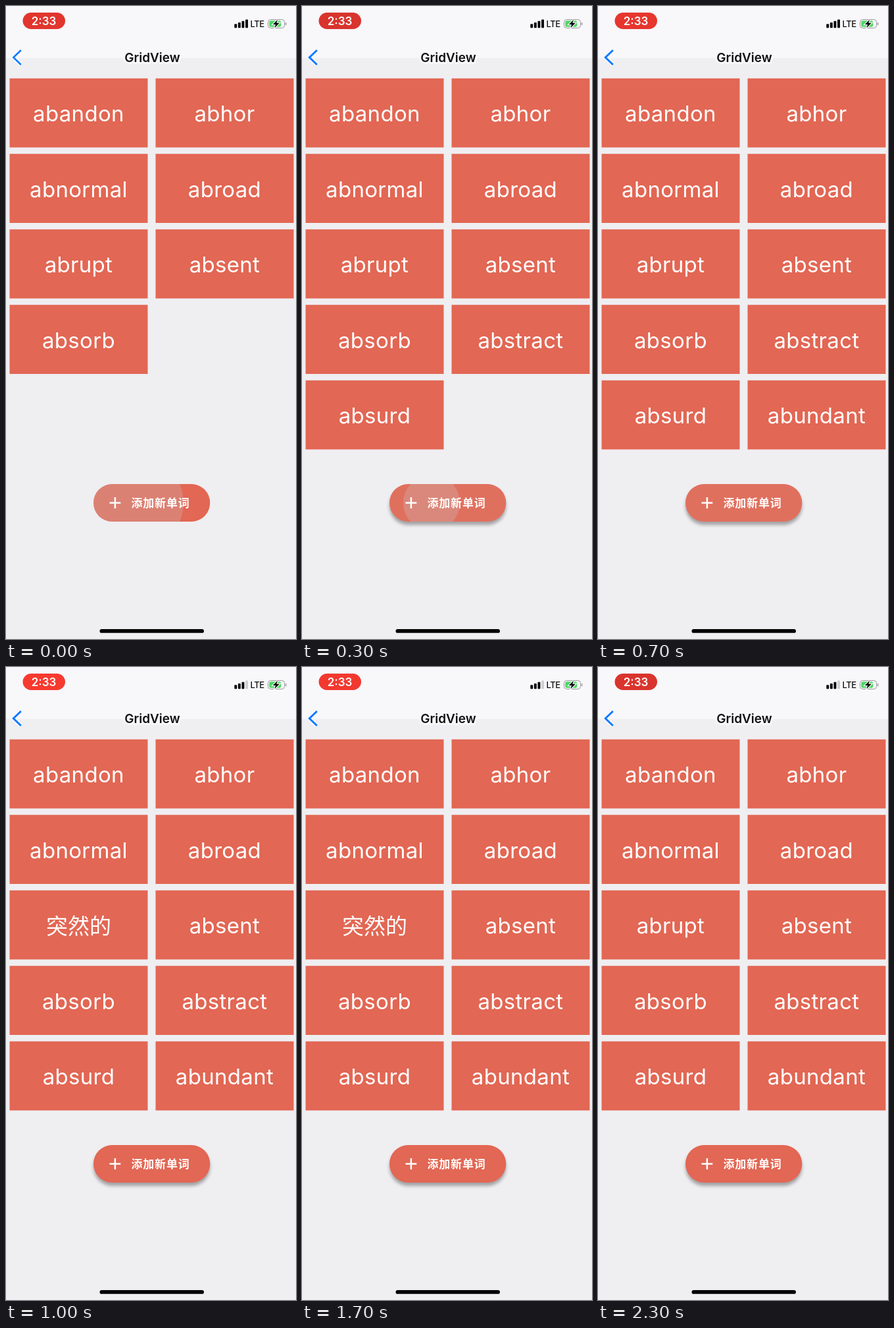
An HTML page with a canvas for the animation above (2400 ms loop, 441 by 960 pixels).

```html
<!DOCTYPE html>
<html lang="zh">
<head>
<meta charset="utf-8">
<title>GridView</title>
<style>
html, body { margin: 0; width: 441px; height: 960px; overflow: hidden; background: #efeef1; }
canvas { display: block; }
</style>
</head>
<body>
<canvas id="stage" width="441" height="960"></canvas>
<script>
const ctx = document.getElementById('stage').getContext('2d');
const LOOP = 2400, STEP = 100;
const CORAL = '#e26754', BAR = '#f8f7fa', PAGE = '#efeef1';
const SANS = 'Inter, Roboto, sans-serif';
const CJK = '"Noto Sans CJK SC", "Noto Sans CJK", sans-serif';
const WORDS = ['abandon', 'abhor', 'abnormal', 'abroad', 'abrupt', 'absent',
  'absorb', 'abstract', 'absurd', 'abundant'];
const FLIPPED = 4;
const TAPS = [-200, 200];   // ripple start times

function box(x, y, w, h, r, fill) {
  ctx.beginPath();
  ctx.roundRect(x, y, w, h, r);
  ctx.fillStyle = fill;
  ctx.fill();
}

function line(points, width, color) {
  ctx.beginPath();
  points.forEach(([x, y]) => ctx.lineTo(x, y));
  ctx.lineWidth = width;
  ctx.strokeStyle = color;
  ctx.stroke();
}

function text(str, x, y, font, color, spacing = 0) {
  ctx.font = font;
  ctx.letterSpacing = spacing + 'px';
  ctx.textAlign = 'center';
  ctx.fillStyle = color;
  ctx.fillText(str, x + spacing / 2, y);
}

function statusBar(t) {
  const glow = (1 - Math.cos((t - 300) / 1000 * Math.PI)) / 2;
  const mix = (a, b) => Math.round(a + (b - a) * glow);
  box(25.5, 10, 64.5, 25, 12.5, `rgb(${mix(217, 255)},${mix(52, 59)},${mix(45, 49)})`);
  text('2:33', 57.5, 29, `600 17px ${SANS}`, '#fff');

  const bars = t < 800 ? 4 : 3;
  for (let i = 0; i < 4; i++) {
    const h = 6 + i * 2.2;
    box(347.3 + i * 5.6, 33.2 - h, 3.9, h, 1, i < bars ? '#050505' : '#cfced1');
  }
  text('LTE', 382.3, 32, `500 13px ${SANS}`, '#111', -0.4);

  ctx.beginPath();
  ctx.roundRect(398.5, 20.5, 25, 13, 4);
  ctx.lineWidth = 1;
  ctx.strokeStyle = '#98989b';
  ctx.stroke();
  box(400.3, 22.3, 18, 9.4, 2.4, '#4cd964');
  box(424.8, 25, 1.6, 4.2, 0.8, '#98989b');
  const bolt = [[413, 20.8], [405.8, 28], [410, 28], [408.4, 33.3], [415.8, 25.8], [411.4, 25.8]];
  line([...bolt, bolt[0]], 2.4, BAR);
  ctx.fillStyle = '#000';
  ctx.fill();
}

function header(t) {
  ctx.fillStyle = BAR;
  ctx.fillRect(0, 0, 441, 79);
  ctx.font = `600 19px ${SANS}`;
  ctx.letterSpacing = '0px';
  ctx.textAlign = 'center';
  ctx.lineJoin = 'round';
  ctx.lineWidth = 6;
  ctx.strokeStyle = BAR;
  ctx.strokeText('GridView', 222.5, 85);
  text('GridView', 222.5, 85, `600 19px ${SANS}`, '#111');
  ctx.lineJoin = 'miter';
  const chevron = [[22.8, 67], [11.3, 78], [22.8, 89]];
  line(chevron, 7, BAR);
  line(chevron, t < STEP ? 2.5 : 3, '#0a7aff');
}

function cards(t) {
  const count = t < 100 ? 7 : t < 300 ? 8 : t < 500 ? 9 : 10;
  for (let i = 0; i < count; i++) {
    const x = i % 2 ? 227.5 : 5.5;
    const y = 109.8 + (i >> 1) * 114.5;
    box(x, y, 210, 104.7, 0, CORAL);
    if (i === FLIPPED && t >= 900 && t < 2000) {
      text('突然的', x + 105, y + 66, `400 33px ${CJK}`, '#fff');
    } else {
      text(WORDS[i], x + 104.8, y + 65.3, `400 33px ${SANS}`, '#fff', 0.3);
    }
  }
}

function ripple(age) {
  if (age < 0 || age >= 600) return;
  const alpha = 0.27 * Math.min(1, (600 - age) / 300);
  ctx.beginPath();
  ctx.arc(197, 753.5, 13 + age * 0.3 + Math.max(0, age - 300) * 0.5, 0, Math.PI * 2);
  ctx.fillStyle = `rgba(200,200,200,${alpha})`;
  ctx.fill();
}

function button(t) {
  ctx.save();
  if (t >= STEP) {
    ctx.shadowColor = 'rgba(0,0,0,0.32)';
    ctx.shadowBlur = 5;
    ctx.shadowOffsetY = 5;
  }
  box(133, 725, 177.3, 57, 28.5, CORAL);
  ctx.restore();

  ctx.save();
  ctx.beginPath();
  ctx.roundRect(133, 725, 177.3, 57, 28.5);
  ctx.clip();
  TAPS.forEach(start => ripple(t - start));
  ctx.restore();

  line([[157.5, 753.5], [174.3, 753.5]], 2.5, '#fff');
  line([[165.9, 745], [165.9, 762]], 2.5, '#fff');
  text('添加新单词', 234.6, 760, `700 17px ${CJK}`, '#fff', 0.8);
}

function draw(t) {
  ctx.fillStyle = PAGE;
  ctx.fillRect(0, 0, 441, 960);
  header(t);
  statusBar(t);
  cards(t);
  button(t);
  box(142.5, 945, 158.5, 5.8, 2.9, '#000');
}

const begin = performance.now();
function tick() {
  const t = (performance.now() - begin) % LOOP;
  draw(Math.floor(t / STEP) * STEP);
  requestAnimationFrame(tick);
}
tick();
</script>
</body>
</html>
```
